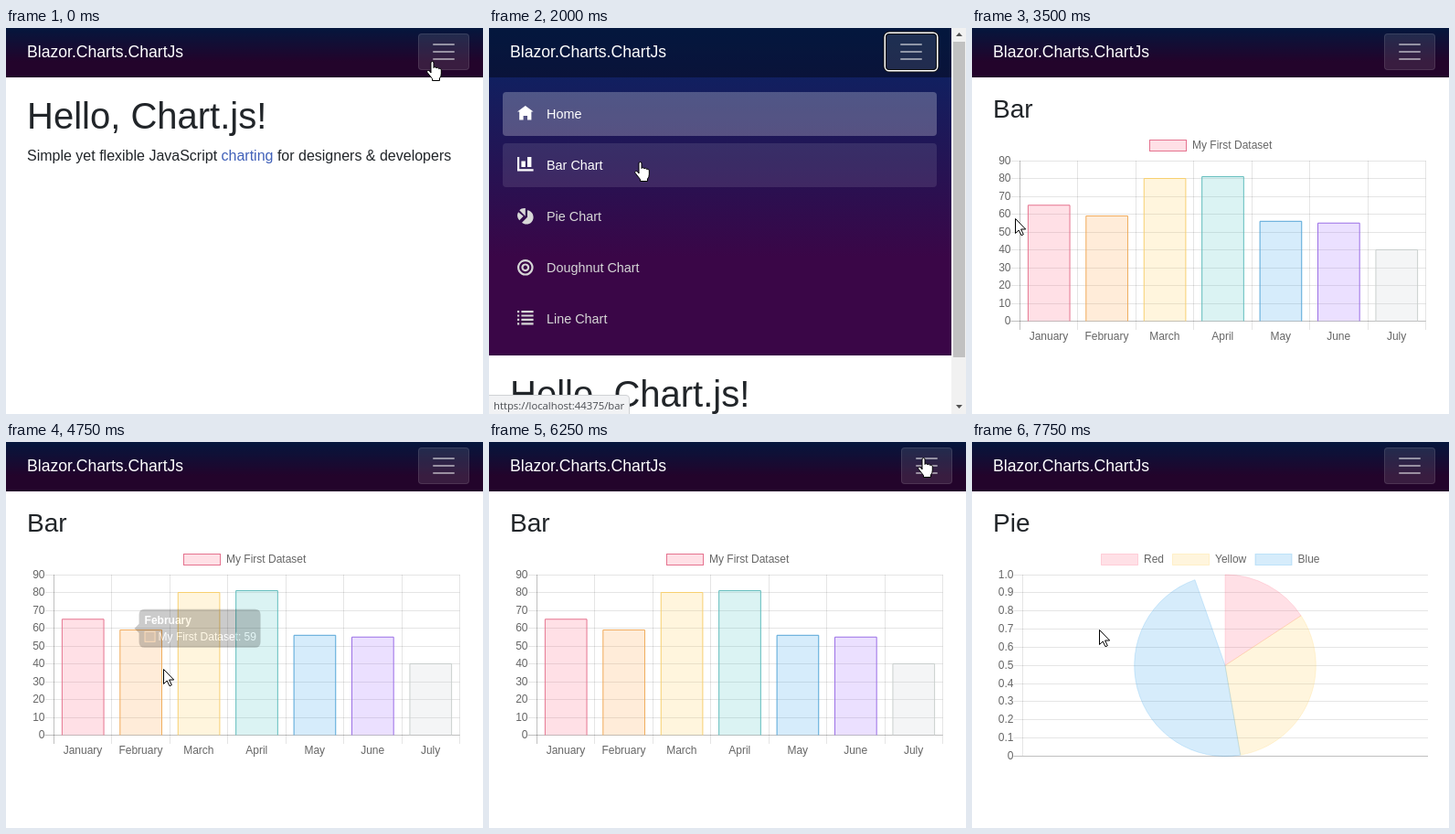
Animation, 522 px wide and 422 px high, one loop 8 s. Source, as an HTML page:

```html
<!DOCTYPE html>
<html lang="en">
<head>
<meta charset="utf-8">
<title>Chart demo</title>
<style>
html, body { margin: 0; width: 100%; height: 100%; overflow: hidden; background: #fff; }
body { position: relative; font: 16px/1.5 "Liberation Sans", Arial, sans-serif; color: #212529; }
#stage { position: absolute; left: 0; top: 0; width: 522px; height: 422px; overflow: hidden; }
#stage > * { position: absolute; }
#side { left: -1px; top: -2px; width: 524px; height: 56px;
  background: linear-gradient(180deg, rgb(5,39,103) 0%, #3a0647 70%); }
#top { height: 56px; background: rgba(0,0,0,.4); }
#brand { position: absolute; left: 24px; top: 14px; font-size: 17.6px; line-height: 28px; color: #fff; white-space: nowrap; }
#toggle { position: absolute; box-sizing: border-box; right: 16px; top: 8px; width: 56px; height: 40px;
  padding: 4px 12px; border: 1px solid rgba(255,255,255,.1); border-radius: 4px; background: rgba(255,255,255,.1); }
#toggle svg { display: block; }
#nav { display: none; padding: 16px 16px 0; }
.item { position: relative; height: 48px; margin-bottom: 8px; padding-left: 48px; border-radius: 4px;
  font-size: 14.4px; line-height: 48px; color: #d7d7d7; }
.item svg { position: absolute; left: 16px; top: 15px; fill: currentColor; }
.item.hover { background: rgba(255,255,255,.1); color: #fff; }
.item.active { background: rgba(255,255,255,.25); color: #fff; }
.open #side { width: 507px; height: 360px; }
.open #nav { display: block; }
.open #toggle { border-color: #101010; box-shadow: 0 0 0 1.5px #fff, 0 0 0 2.5px #101010; }
.open #main { top: 375.6px; }
#main { left: 23px; top: 71.6px; white-space: nowrap; }
h1, h3, p { margin: 0; font-weight: 400; line-height: 1.2; }
h1 { font-size: 40px; margin-bottom: 8px; }
h3 { font-size: 28px; }
p { line-height: 24px; }
p span { color: #4161b9; }
#chart, #pointer { left: 0; top: 0; }
#chart { font-size: 12px; }
#scroll { left: 506px; top: 0; width: 16px; height: 422px; background: #f1f1f1; }
#thumb { position: absolute; left: 2px; top: 15px; width: 13px; background: #c1c1c1; }
#scroll svg { position: absolute; left: 0; top: 0; }
#status { left: -1px; top: 401px; width: 155px; height: 22px; box-sizing: border-box; padding-left: 5px;
  border: 1px solid #d0d2d5; border-radius: 0 4px 0 0; background: #f1f2f4; color: #4a4d52;
  font: 11.3px/21px "Open Sans", "Noto Sans", sans-serif; white-space: nowrap; }
</style>
</head>
<body>
<div id="stage">
  <div id="main"></div>
  <svg id="chart" width="522" height="422"></svg>
  <div id="side">
    <div id="top">
      <div id="brand">Blazor.Charts.ChartJs</div>
      <div id="toggle"><svg width="30" height="30" fill="none" stroke="#fff" stroke-opacity=".5" stroke-width="2" stroke-linecap="round"><path d="M4 7h22M4 15h22M4 23h22"/></svg></div>
    </div>
    <div id="nav"></div>
  </div>
  <div id="scroll">
    <div id="thumb"></div>
    <svg width="16" height="422" fill="#505050"><path d="M5 9l3.5-4 3.5 4zM5 412h7l-3.5 4z"/></svg>
  </div>
  <div id="status">https://localhost:44375/bar</div>
  <svg id="pointer" width="522" height="422" fill="#fff" stroke="#000">
    <path id="arrow" d="M.5 .5V16.5L4.2 13 7 18.7 9.3 17.7 6.6 12H11.7Z"/>
    <path id="hand" d="M5 2Q5 .5 6.5 .5T8 2V7.5Q8.2 6.5 9.5 6.7T11 8Q11.3 7 12.5 7.3T13.8 8.7Q14.3 8 15.3 8.4T16.3 10V14Q16.3 17 14.5 19V21.5H6.5V19.5L1 12.5Q.3 11 1.5 10.5T4 11.5L5 13Z"/>
  </svg>
</div>
<script>
const LOOP = 8000, STEP = 250;
const $ = id => document.getElementById(id);
const ease = u => 1 - (1 - Math.min(1, Math.max(0, u))) ** 4;
const show = (el, on) => { el.style.display = on ? '' : 'none'; };

const items = [
  ['Home', 'M4 0l-4 3h1v4h2v-2h2v2h2v-4l1 0z'],
  ['Bar Chart', 'M0 0v7h8v-1h-7v-6zM5 0v5h2v-5zM2 2v3h2v-3z'],
  ['Pie Chart', 'M3.5 0c-.97 0-1.84.4-2.47 1.03l2.97 2.97v-3.97c-.16-.02-.33-.03-.5-.03zM5 1.06v3.41l-2.72 2.72c.61.5 1.37.81 2.22.81 1.93 0 3.5-1.57 3.5-3.5 0-1.76-1.31-3.19-3-3.44zM.5 1.9c-.3.5-.5 1.05-.5 1.66 0 .96.4 1.8 1.03 2.44l2-2z'],
  ['Doughnut Chart', 'M4 0a4 4 0 1 0 .01 0zM4 1a3 3 0 1 1-.01 0zM4 2a2 2 0 1 0 .01 0zM4 3a1 1 0 1 1-.01 0z'],
  ['Line Chart', [0, 2, 4, 6].map(y => `M0 ${y}v1h1v-1zM2 ${y}v1h6v-1z`).join('')]
];
$('nav').innerHTML = items.map(([label, d]) =>
  `<div class="item"><svg width="17.6" height="17.6" viewBox="0 0 8 8"><path fill-rule="evenodd" d="${d}"/></svg>${label}</div>`).join('');
const links = [...document.querySelectorAll('.item')];

const headings = {
  home: '<h1>Hello, Chart.js!</h1><p>Simple yet flexible JavaScript <span>charting</span> for designers &amp; developers</p>',
  bar: '<h3>Bar</h3>',
  pie: '<h3>Pie</h3>'
};
const order = ['home', 'bar', 'pie'];

// month, value, fill, border
const bars = [
  ['January', 65, '255,99,132', '#e5738f'],
  ['February', 59, '255,159,64', '#f0ac5c'],
  ['March', 80, '255,205,86', '#f7d070'],
  ['April', 81, '75,192,192', '#62bcbc'],
  ['May', 56, '54,162,235', '#55a6d8'],
  ['June', 55, '153,102,255', '#9b6fe6'],
  ['July', 40, '201,203,207', '#c9cfcd']
];
// label, share, colour, legend x
const slices = [
  ['Red', 1, '255,99,132', 141.5],
  ['Yellow', 2, '255,205,86', 219.5],
  ['Blue', 3, '54,162,235', 310]
];

const line = (x1, y1, x2, y2, a = .1) => `<path d="M${x1} ${y1}L${x2} ${y2}" stroke="#000" stroke-opacity="${a}"/>`;
const text = (x, y, s, anchor = 'start', extra = 'fill="#666"') =>
  `<text x="${x}" y="${y + 4}" text-anchor="${anchor}" ${extra}>${s}</text>`;
const legend = (x, label, rgb, stroke) =>
  `<rect x="${x}" y="122.5" width="40" height="12" fill="rgba(${rgb},.2)" stroke="${stroke}"/>` + text(x + 46.5, 128, label);

function yAxis(left, right, bottom, step, labels) {
  return labels.map((s, i) => {
    const y = Math.round(bottom - i * step) - .5;
    return line(left - 10, y, right, y, i ? .1 : .25) + text(left - 10, y - .5, s, 'end');
  }).join('');
}

const CELL = 444 / 7, BASE = 320.5, UNIT = 1.95;
const barAxes = yAxis(52.5, 496.5, 321, 19.5, Array.from({ length: 10 }, (_, i) => i * 10)) +
  Array.from({ length: 8 }, (_, i) => {
    const x = Math.round(52 + i * CELL) + .5;
    return line(x, 145, x, 330, i ? .1 : .25);
  }).join('') +
  bars.map(([name], i) => text(52.3 + (i + .5) * CELL, 337, name, 'middle')).join('') +
  legend(194.5, 'My First Dataset', bars[0][2], bars[0][3]);

const pieAxes = yAxis(55.5, 499, 344, 19.85, Array.from({ length: 11 }, (_, i) => i ? (i / 10).toFixed(1) : '0')) +
  line(55.5, 145, 55.5, 343) +
  slices.map(([label, , rgb, x]) => legend(x, label, rgb, `rgba(${rgb},.25)`)).join('');

function barChart(p) {
  return barAxes + bars.map(([, v, rgb, edge], i) => {
    const w = CELL * .72, x = 52.5 + (i + .5) * CELL - w / 2, h = v * UNIT * p;
    const d = `M${x} ${BASE}v${-h}h${w}v${h}`;
    return `<path d="${d}" fill="rgba(${rgb},.2)" stroke="${edge}"/>`;
  }).join('');
}

function pieChart(p) {
  const cx = 277, cy = 244.3, r = 99.3;
  let a = 0;
  const at = b => `${cx + r * Math.sin(b)} ${cy - r * Math.cos(b)}`;
  return pieAxes + slices.map(([, share, rgb]) => {
    const b = a + share / 6 * 2 * Math.PI * p;
    const d = `M${cx} ${cy}L${at(a)}A${r} ${r} 0 ${b - a > Math.PI ? 1 : 0} 1 ${at(b)}Z`;
    a = b;
    return `<path d="${d}" fill="rgba(${rgb},.2)" stroke="rgba(${rgb},.2)"/>`;
  }).join('');
}

// shift runs from the first bar (0) to the second (1)
function tooltip(index, shift, opacity) {
  const [name, value, rgb, edge] = bars[index];
  const top = i => BASE - bars[i][1] * UNIT;
  const x = 91 + CELL * shift, y = top(0) + (top(1) - top(0)) * shift - 21;
  const white = 'fill="#fff"';
  return `<g transform="translate(${x} ${y})" opacity="${opacity}">
    <path d="M6 0H127Q133 0 133 6V36Q133 42 127 42H6Q0 42 0 36V26L-5 21 0 16V6Q0 0 6 0Z" fill="#000" fill-opacity=".8"/>
    ${text(6, 12, name, 'start', white + ' font-weight="700"')}
    <rect x="6.5" y="24.5" width="11" height="11" fill="rgba(${rgb},.2)" stroke="${edge}"/>
    ${text(21, 30, 'My First Dataset: ' + value, 'start', white)}</g>`;
}

// time, x, y of the hot spot, hand or arrow
const path = [
  [0, 466, 36, 1], [250, 472, 33, 1], [500, 481, 29, 1],
  [1750, 330, 96, 1], [2000, 165, 146, 1], [2250, 154, 141, 1], [2500, 154, 141, 0],
  [3000, 140, 152, 0], [3250, 90, 180, 0], [3500, 47, 208, 0],
  [4000, 72, 224, 0], [4250, 88, 234, 0], [4500, 104, 241, 0], [4750, 172, 248, 0], [5000, 176, 246, 0],
  [5250, 205, 222, 0], [5500, 272, 166, 0], [5750, 350, 108, 0], [6000, 430, 58, 0],
  [6250, 475, 17, 1], [6750, 300, 120, 1], [7000, 146, 207, 1], [7250, 139, 205, 0]
];
// time, bar, shift, opacity
const tips = [[0, 0, 0, 0], [4000, 0, 0, .6], [4250, 0, 0, 1], [4750, 1, .86, .25], [5000, 1, 1, 0]];
const last = (list, t) => list.filter(k => k[0] <= t).pop();
const within = (t, a, b) => t >= a && t < b;

function draw(t) {
  const page = t < 2385 ? 'home' : t < 7232 ? 'bar' : 'pie';
  const open = within(t, 1250, 2385) || within(t, 6500, 7232);
  const [, x, y, hand] = last(path, t);

  $('stage').className = open ? 'open' : '';
  $('main').innerHTML = headings[page];
  show($('scroll'), open);
  $('thumb').style.height = (page === 'home' ? 345 : 256) + 'px';
  show($('status'), within(t, 2000, 3250));

  const over = open && x < 490 ? Math.floor((y - 70) / 56) : -1;
  links.forEach((el, i) => {
    el.classList.toggle('active', i === order.indexOf(page));
    el.classList.toggle('hover', i === over);
  });

  let art = '';
  if (!open && page === 'bar') {
    const [, i, shift, alpha] = last(tips, t);
    art = barChart(ease((t - 2385) / 1000)) + (alpha ? tooltip(i, shift, alpha) : '');
  } else if (page === 'pie') art = pieChart(ease((t - 7232) / 1000));
  $('chart').innerHTML = art;

  show($('hand'), hand);
  show($('arrow'), !hand);
  $('hand').setAttribute('transform', `translate(${x - 6} ${y})`);
  $('arrow').setAttribute('transform', `translate(${x} ${y})`);
}

const start = performance.now();
let shown = -1;
function tick() {
  const t = Math.floor((performance.now() - start) % LOOP / STEP) * STEP;
  if (t !== shown) draw(shown = t);
  requestAnimationFrame(tick);
}
tick();
</script>
</body>
</html>
```
